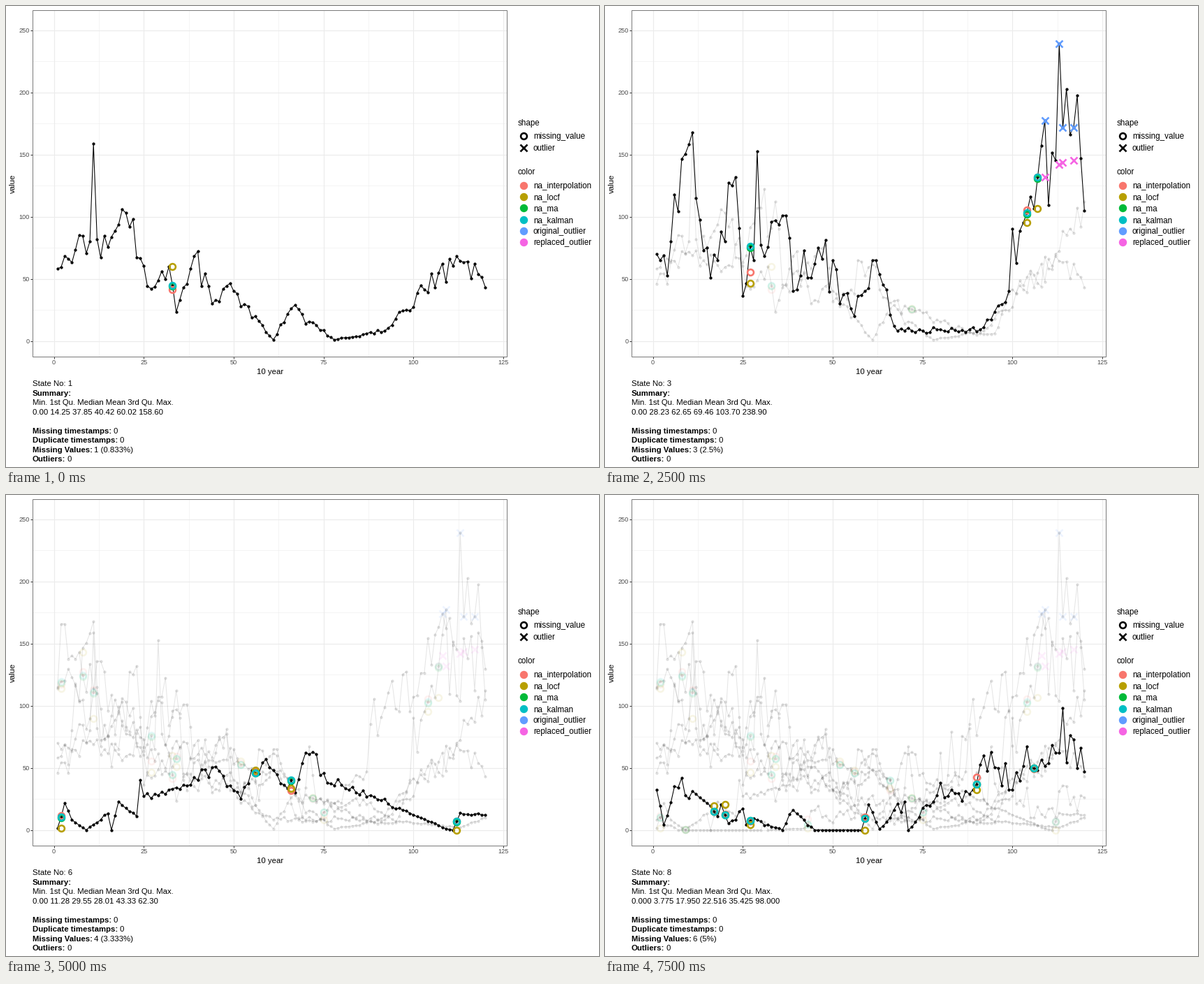
Recreate the animation shown at these times as a matplotlib script. Size 849 px wide and 660 px high, loop 8 s.

```python
import numpy as np
import matplotlib.pyplot as plt
from matplotlib.animation import FuncAnimation

W, H, DPI = 849, 660, 100
PT = 72 / DPI
plt.rcParams["font.family"] = "Liberation Sans"

COLORS = ["#F8766D", "#B79F00", "#00BA38", "#00BFC4", "#619CFF", "#F564E3"]
NAMES = ["na_interpolation", "na_locf", "na_ma", "na_kalman",
         "original_outlier", "replaced_outlier"]
FAINT = 0.1
MONTHS = np.arange(1, 121)

fig = plt.figure(figsize=(W / DPI, H / DPI), dpi=DPI, facecolor="white")
ax = fig.add_axes([0, 0, 1, 1])
ax.set(xlim=(0, W), ylim=(H, 0))
ax.axis("off")


def px(x):
    return 68.6 + 5.148 * np.asarray(x, float)


def py(y):
    return 479.5 - 1.78 * np.asarray(y, float)


def stroke(xs, ys, color, width, z):
    ax.plot(xs, ys, color=color, lw=width * PT, zorder=z, solid_capstyle="butt")


def label(x, y, s, size=11.4, **kw):
    """Text whose capitals are centred on y."""
    return ax.text(x, y + 0.36 * size, s, fontsize=size * PT, va="baseline", **kw)


def marks(xs, ys, shape, color, width=2.6, face="none"):
    size = 10 if shape == "x" else 8.8
    return ax.plot(xs, ys, ls="", marker=shape, ms=size * PT, mew=width * PT,
                   mec=color, mfc=face, zorder=5)[0]


# ---- panel, axes and legend ----
LEFT, RIGHT, TOP, BOTTOM = 38, 717.3, 5.5, 502

for v in np.arange(0, 126, 12.5):
    major = v % 25 == 0
    stroke([px(v)] * 2, [TOP, BOTTOM], "#EBEBEB", 1.1 if major else 0.55, 0)
    if major:
        stroke([px(v)] * 2, [BOTTOM, BOTTOM + 3], "#333333", 1, 1)
        label(px(v), 510, f"{v:.0f}", 9.2, ha="center", color="#4D4D4D")
for v in range(0, 251, 25):
    major = v % 50 == 0
    stroke([LEFT, RIGHT], [py(v)] * 2, "#EBEBEB", 1.1 if major else 0.55, 0)
    if major:
        stroke([LEFT - 3, LEFT], [py(v)] * 2, "#333333", 1, 1)
        label(33.7, py(v), str(v), 9.2, ha="right", color="#4D4D4D")
ax.add_patch(plt.Rectangle((LEFT, TOP), RIGHT - LEFT, BOTTOM - TOP, fill=False,
                           ec="#7A7A7A", lw=PT, zorder=30))
label(378, 523, "10 year", ha="center")
ax.text(10, 254, "value", fontsize=11.4 * PT, rotation=90, ha="center", va="center")

label(733, 166.7, "shape", 11.6)
for y, shape, name in [(186.3, "o", "missing_value"), (202.6, "x", "outlier")]:
    marks([741], [y], shape, "black")
    label(755, y, name, 11.6)
label(733, 237.3, "color", 11.6)
for i, (name, c) in enumerate(zip(NAMES, COLORS)):
    y = 256.6 + 16.3 * i
    marks([741], [y], "o", c, face=c)
    label(755, y, name, 11.6)

# ---- caption ----
ROW = [540 + 13.5 * i for i in range(9)]
state_text = label(37.7, ROW[0], "")
label(37.7, ROW[1], "Summary:", weight="bold")
label(37.7, ROW[2], "Min. 1st Qu. Median Mean 3rd Qu. Max.")
stats_text = label(37.7, ROW[3], "")


def field(row, name):
    bold = label(37.7, ROW[row], name, weight="bold")
    return label(bold.get_window_extent().x1 + 2.7, ROW[row], "0")


field(5, "Missing timestamps:")
field(6, "Duplicate timestamps:")
missing_text = field(7, "Missing Values:")
field(8, "Outliers:")

# ---- the eight decades ----
states = []


def add_state(stats, rough, shape, gaps, outliers=()):
    """shape: main bends {month: value}, with seeded roughness between them;
    gaps: (month, value before, fitted value, value after);
    outliers: (month, value, replacement)."""
    fixed = dict(shape)
    for m, before, fit, after in gaps:
        fixed.update({m - 1: before, m: fit, m + 1: after})
    fixed.update({m: v for m, v, _ in outliers})
    keys = sorted(fixed)
    y = np.interp(MONTHS, keys, [fixed[k] for k in keys])
    noise = np.random.default_rng(len(states)).normal(size=120).clip(-1.6, 1.6)
    y = np.where(np.isin(MONTHS, keys), y, y * (1 + rough * noise))

    parts = ax.plot(px(MONTHS), py(y), "-o", color="black", lw=1.07 * PT,
                    ms=3.4 * PT, mew=0.8 * PT)
    month, before, fit, after = np.array(gaps, float).T
    for values, c in zip([(before + after) / 2, before, 0.99 * fit, fit], COLORS):
        parts.append(marks(px(month), py(values), "o", c))
    for m, *pair in outliers:
        for v, c in zip(pair, COLORS[4:]):
            parts.append(marks([px(m)], [py(v)], "x", c))
    share = f"{len(gaps) / 1.2:.3f}".rstrip("0").rstrip(".")
    states.append((parts, stats, f"{len(gaps)} ({share}%)"))


add_state("0.00 14.25 37.85 40.42 60.02 158.60", 0.13,
          {1: 58, 10: 80, 11: 158.6, 12: 82, 20: 103, 26: 44, 39: 68, 44: 30,
           50: 40, 61: 1, 66: 26, 78: 1, 92: 8, 107: 55, 112: 68, 120: 43},
          [(33, 59.8, 44.6, 23.2)])

add_state("3.00 29.77 46.55 48.53 67.40 111.80", 0.13,
          {1: 46, 9: 70, 22: 60, 29: 107, 35: 90, 36: 45, 48: 77, 50: 32,
           56: 38, 57: 65, 62: 60, 64: 35, 90: 5, 95: 6, 99: 38, 110: 58,
           120: 111.8},
          [(72, 26, 25.6, 24)])

add_state("0.00 28.23 62.65 69.46 103.70 238.90", 0.2,
          {1: 70, 5: 80, 10: 158, 16: 51, 23: 132, 25: 36, 29: 152.7, 31: 68,
           37: 101, 39: 40, 46: 75, 56: 20, 62: 65, 68: 8, 91: 9, 99: 40,
           100: 90, 110: 109, 112: 145, 120: 105},
          [(27, 46.2, 76, 64.9), (104, 95, 103, 116.2), (107, 106.5, 131.7, 157.3)],
          [(109, 177.3, 131.9), (113, 238.9, 141.6), (114, 171.6, 143.8),
           (117, 171.7, 145)])

add_state("6.00 28.23 67.65 72.42 112.78 174.00", 0.13,
          {1: 115, 2: 165.7, 5: 140, 12: 110, 13: 72, 17: 105, 24: 59, 29: 104,
           36: 40, 45: 40, 58: 11, 73: 7, 87: 47, 88: 85, 97: 125, 99: 95,
           106: 157, 112: 108, 114: 154, 120: 129.5},
          [(8, 143, 124.3, 111), (34, 51, 57.8, 67), (75, 8, 14.3, 15.8)],
          [(108, 174, 140.2)])

add_state("0.00 12.82 44.50 46.79 67.88 135.50", 0.1,
          {1: 114, 5: 123, 14: 127.5, 15: 96, 25: 73, 32: 45, 33: 66, 42: 61,
           55: 50, 57: 24, 58: 47, 66: 41, 69: 11, 71: 67, 73: 22, 88: 22,
           95: 7, 113: 2, 120: 10},
          [(2, 114, 119.4, 120), (11, 89.7, 111, 135.5), (52, 55.5, 52.8, 52.3)])

add_state("0.00 11.28 29.55 28.01 43.33 62.30", 0.07,
          {5: 8, 9: 0, 15: 13, 16: 0, 18: 23, 23: 11, 24: 40, 25: 27, 34: 34,
           45: 51, 52: 25, 58: 54, 70: 62, 73: 61, 74: 44, 88: 28, 109: 1,
           120: 12},
          [(2, 1.6, 10.2, 21.7), (56, 48.3, 46, 45.3), (66, 33.4, 40, 29.8),
           (112, 0, 6.8, 13.5)])

add_state("0.000 1.025 14.400 19.045 31.500 96.200", 0.35,
          {1: 8, 7: 0, 30: 0, 31: 6.6, 32: 0, 50: 6, 58: 26, 68: 9, 77: 30,
           87: 73, 92: 24, 99: 96.2, 101: 21, 120: 26},
          [(9, 0.2, 0.5, 0), (43, 1.3, 4.5, 15.6)])

add_state("0.000 3.775 17.950 22.516 35.425 98.000", 0.22,
          {1: 32.5, 3: 4, 6: 35, 14: 24, 25: 17, 36: 0, 39: 16, 45: 0, 58: 0,
           63: 1, 70: 23, 71: 0, 79: 28, 96: 50, 112: 62, 114: 98, 115: 54,
           116: 76, 120: 47},
          [(17, 19.4, 15, 10.8), (20, 20.6, 12, 5.2), (27, 4.3, 7.6, 9.2),
           (59, 0, 9.4, 20.4), (90, 32.4, 37, 52.5), (106, 49.6, 50, 48.2)])


def show_state(k):
    for i, (parts, _, _) in enumerate(states):
        for p in parts:
            p.set_visible(i <= k)
            p.set_alpha(1 if i == k else FAINT)
            p.set_zorder(10 if i == k else 3)
    _, stats, missing = states[k]
    state_text.set_text(f"State No: {k + 1}")
    stats_text.set_text(stats)
    missing_text.set_text(missing)
    return []


anim = FuncAnimation(fig, show_state, frames=len(states), interval=1000,
                     repeat=True, repeat_delay=0, blit=False)
plt.show()
```
